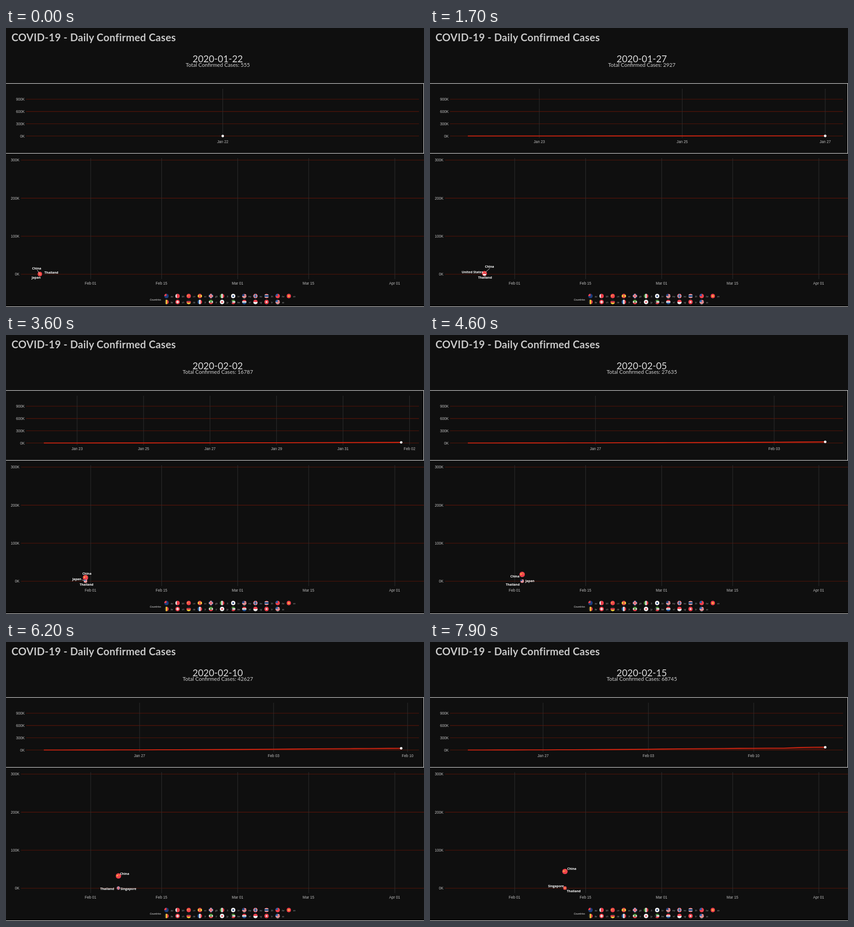
An HTML page that plays this animation: 917 px wide and 611 px high, repeating every 8 s.

```html
<!DOCTYPE html>
<html lang="en">
<head>
<meta charset="utf-8">
<title>Daily Confirmed Cases</title>
<style>
  html, body { margin: 0; width: 100%; height: 100%; overflow: hidden; background: #0f0f0f; }
  svg { display: block; width: 917px; height: 611px; }
  text { fill: #bebebe; }
  .comic { font-family: Lato, "Open Sans", sans-serif; }
  .title { font-size: 22.5px; font-weight: 700; letter-spacing: .3px; fill: #c8c8c8; }
  .date { font-size: 20.5px; text-anchor: middle; fill: #d9d9d9; }
  .total { font-size: 11.7px; text-anchor: middle; fill: #d0d0d0; }
  .axis { font: 8.2px "Liberation Sans", Arial, sans-serif; }
  .right { text-anchor: end; }
  .mid { text-anchor: middle; }
  .name { font: 700 7px "Open Sans", sans-serif; fill: #fff; }
  .legend { font-size: 6.2px; font-style: italic; fill: #e0e0e0; }
  .code { font-size: 5px; font-style: italic; text-anchor: middle; fill: #999; }
  .grid { stroke: #2e2e2e; stroke-width: 1.07; }
  .rule { stroke: #5a1509; stroke-width: 1.07; }
  .frame { stroke: #f2f2f2; shape-rendering: crispEdges; }
  .curve { fill: none; stroke: #cc2410; stroke-width: 2.1; }
  .area { fill: #b31c0c; opacity: .25; }
  .lead { stroke: #fff; stroke-width: .8; }
</style>
</head>
<body>
<svg viewBox="0 0 917 611">
  <defs id="defs"></defs>
  <g id="still"></g>
  <g id="live"></g>
</svg>
<script>
const FRAME = 100, FRAMES = 80, DAY_RATE = 72 / 239;
const START = Date.UTC(2020, 0, 22), DAY_MS = 864e5;

const totals = [555, 654, 941, 1434, 2118, 2927, 5578, 6166, 8234, 9927, 12038, 16787, 19881,
  23892, 27635, 30817, 34330, 37059, 40086, 42627, 44667, 45046, 60193, 66667, 68745];
const china = [547, 639, 916, 1399, 2062, 2863, 5494, 6070, 8124, 9783, 11871, 16607, 19693,
  23680, 27409, 30553, 34075, 36778, 39790, 42306, 44327];

// Label offsets: [x, y] from the bubbles; lead is a line from label to bubble
const phases = [
  { from: 0, third: 'Japan', flag: 'vn', china: [-17, -10], thai: [10, 0], other: [-18, 11], lead: [-6, -8, -1, -1] },
  { from: 6, third: 'United States', flag: 'sg', china: [1, -13], thai: [-14, 11], other: [-50, -1], lead: [12, -12, 2, -3] },
  { from: 22, third: 'Taiwan, China', flag: 'us', china: [-4, -8], thai: [-4, 11], other: [-58, 1], lead: [7, -10, 1, -4] },
  { from: 30, third: 'Japan', flag: 'us', china: [-7, -6.5], thai: [-13, 11], other: [-29, -1], lead: [-8, -2, -1, 1] },
  { from: 40, third: 'Japan', flag: 'my', china: [-26, 6.8], thai: [-36, 11], other: [7, 2.5] },
  { from: 50, third: 'Singapore', flag: 'gb', china: [3.5, -2], thai: [-40, 4.5], other: [4.5, 4.5] },
  { from: 70, third: 'Singapore', flag: 'vn', china: [5, -3.7], thai: [4, 10], other: [-37, -1.5] }
];

const R = '#ee404c', W = '#f0f0f0', B = '#2a5fa8', N = '#1d3d7c', Y = '#ffd23c', G = '#4f9a3c', K = '#222';
// code: [stripe direction, stripes, emblem, emblem colour]
const flags = {
  au: ['h', [N], 'canton', R], be: ['v', [K, Y, R]], bh: ['v', [W, R, R]], ch: ['h', [R], 'plus', W],
  cn: ['h', [R], 'stars', Y], de: ['h', [K, R, Y]], es: ['h', [R, Y, Y, R], 'dot', R], fr: ['v', [B, W, R]],
  gb: ['h', [N], 'cross', R], ir: ['h', [G, W, R], 'dot', G], it: ['v', [G, W, R]], jp: ['h', [W], 'dot', R],
  kr: ['h', [W], 'dot', N], kw: ['h', [G, W, R], 'side', K], my: ['h', [R, W, R, W, R, W], 'canton', N],
  nl: ['h', [R, W, B]], no: ['h', [R], 'cross', N], sg: ['h', [R, W]], th: ['h', [R, W, N, N, W, R]],
  tr: ['h', [R], 'dot', W], tw: ['h', [R], 'canton', B], us: ['h', [R, W, R, W, R, W], 'canton', B],
  vn: ['h', [R], 'star', Y]
};
const star = (x, y, r) => 'M' + Array.from({ length: 10 }, (_, i) => {
  const a = i * Math.PI / 5, q = i % 2 ? r * .42 : r;
  return `${(x + q * Math.sin(a)).toFixed(2)} ${(y - q * Math.cos(a)).toFixed(2)}`;
}).join('L') + 'Z';
const emblems = {
  canton: c => `<path d="M-5-5H0V0H-5Z" fill="${c}"/>`,
  side: c => `<path d="M-5-5L-2-2V2L-5 5Z" fill="${c}"/>`,
  plus: c => `<path d="M-3 0H3M0-3V3" stroke="${c}" stroke-width="2"/>`,
  cross: c => `<path d="M-5 0H5M0-5V5" stroke="${W}" stroke-width="3.4"/><path d="M-5 0H5M0-5V5" stroke="${c}" stroke-width="1.7"/>`,
  dot: c => `<circle r="1.9" fill="${c}"/>`,
  star: c => `<path d="${star(0, 0, 2.9)}" fill="${c}"/>`,
  stars: c => `<path d="${star(-2, -.6, 2)}${star(.8, -2.8, .9)}${star(1.6, -.8, .9)}" fill="${c}"/>`
};

const $ = id => document.getElementById(id);
const line = (cls, x1, y1, x2, y2) => `<line class="${cls}" x1="${x1}" y1="${y1}" x2="${x2}" y2="${y2}"/>`;
const text = (cls, x, y, s) => `<text class="${cls}" x="${x}" y="${y}">${s}</text>`;
const flag = (code, x, y, r) => `<use href="#${code}" transform="translate(${x} ${y}) scale(${r / 5})"/>`;
const dateOf = day => new Date(START + day * DAY_MS);
const shortDate = day => {
  const d = dateOf(day);
  return ['Jan', 'Feb', 'Mar', 'Apr'][d.getUTCMonth()] + ' ' + String(d.getUTCDate()).padStart(2, '0');
};
const sample = (list, t) => {
  const i = Math.floor(t), a = list[i], b = list[i + 1] ?? a;
  return a + (b - a) * (t - i);
};
const topY = v => 236.5 - v * 26.83 / 3e5;
const mapX = day => 74.6 + day * 11.12;
const mapY = v => 539.3 - v * 250 / 3e5;

function drawFlags() {
  return '<clipPath id="round"><circle r="5"/></clipPath>' +
    Object.entries(flags).map(([code, [dir, stripes, kind, colour]]) => {
      const step = 10 / stripes.length;
      const bars = stripes.map((c, i) => {
        const at = -5 + i * step;
        return dir === 'h'
          ? `<rect x="-5" y="${at}" width="10" height="${step}" fill="${c}"/>`
          : `<rect x="${at}" y="-5" width="${step}" height="10" fill="${c}"/>`;
      }).join('');
      return `<g id="${code}" clip-path="url(#round)">${bars}${kind ? emblems[kind](colour) : ''}</g>`;
    }).join('');
}

function drawStill() {
  let s = text('comic title', 12, 29, 'COVID-19 - Daily Confirmed Cases');
  for (const y of [121.5, 274.5, 610.5]) s += line('frame', 0, y, 917, y);
  s += line('frame', 916.5, 121, 916.5, 275);
  for (let i = 0; i < 4; i++) {
    const high = topY(i * 3e5), low = mapY(i * 1e5);
    s += line('rule', 44, high, 906, high) + text('axis right', 41, high + 3, i * 300 + 'K');
    s += line('rule', 33, low, 917, low) + text('axis right', 29.5, low + 3, i * 100 + 'K');
  }
  for (const day of [10, 24, 39, 53, 70]) {
    const x = mapX(day);
    s += line('grid', x, 285, x, 550) + text('axis mid', x - .4, 562, shortDate(day));
  }
  s += text('comic legend', 315.5, 596.5, 'Countries');
  Object.keys(flags).forEach((code, i) => {
    const x = 352 + 24.4 * (i >> 1), y = i % 2 ? 600 : 587;
    s += flag(code, x, y, 4.9) + text('comic code', x + 12, y + 2.5, code);
  });
  return s;
}

// Each day lands on a whole frame; time runs evenly between those frames
function spanAt(n) {
  const key = d => Math.round(d / DAY_RATE);
  let d = 0;
  while (key(d + 1) <= n) d++;
  return d + (n - key(d)) / (key(d + 1) - key(d));
}

function drawCurve(n) {
  const span = spanAt(n), head = topY(sample(totals, span));
  const x = day => span ? 83 + 784 * day / span : 475.5;
  const [first, step] = span < 4.8 ? [0, 1] : span < 12.5 ? [1, 2] : [5, 7];
  let s = '';
  for (let day = first; day <= span * 1.05; day += step)
    s += line('grid', x(day), 133, x(day), 241) + text('axis mid', x(day), 252, shortDate(day));
  if (span) {
    let path = '';
    for (let day = 0; day < span; day++) path += `${x(day)} ${topY(totals[day])}L`;
    path += `867 ${head}`;
    s += `<path class="area" d="M83 236.5L${path}V236.5Z"/><path class="curve" d="M${path}"/>`;
  }
  return s + `<circle cx="${x(span)}" cy="${head}" r="2.7" fill="#fff"/>`;
}

function drawBubbles(n) {
  const p = n % 4 / 4;
  const day = Math.floor(n / 4) + (p < .5 ? 4 * p ** 3 : 1 - 4 * (1 - p) ** 3);
  const x = mapX(day) - .3, y = mapY(sample(china, day)), base = 538;
  const ph = phases.findLast(q => n >= q.from);
  const name = (s, [dx, dy], y0) => text('name', x + dx, y0 + dy, s);
  let s = flag('th', x, base + .9, 3.9) + flag('cn', x, y, 5 + Math.min(1, day / 9)) + flag(ph.flag, x, base + .8, 3.7);
  if (ph.lead) {
    const [a, b, c, d] = ph.lead;
    s += line('lead', x + a, base + b, x + c, base + d);
  }
  return s + name('China', ph.china, y) + name('Thailand', ph.thai, base) + name(ph.third, ph.other, base);
}

function draw(n) {
  const day = Math.round(n * DAY_RATE);
  $('live').innerHTML =
    text('comic date', 464.5, 75, dateOf(day).toISOString().slice(0, 10)) +
    text('comic total', 464.7, 85.3, 'Total Confirmed Cases: ' + totals[day]) +
    drawCurve(n) + drawBubbles(n);
}

$('defs').innerHTML = drawFlags();
$('still').innerHTML = drawStill();
let shown = -1;
const begin = performance.now();
function tick() {
  const n = Math.floor(Math.max(0, performance.now() - begin) / FRAME) % FRAMES;
  if (n !== shown) draw(shown = n);
  requestAnimationFrame(tick);
}
tick();
</script>
</body>
</html>
```
